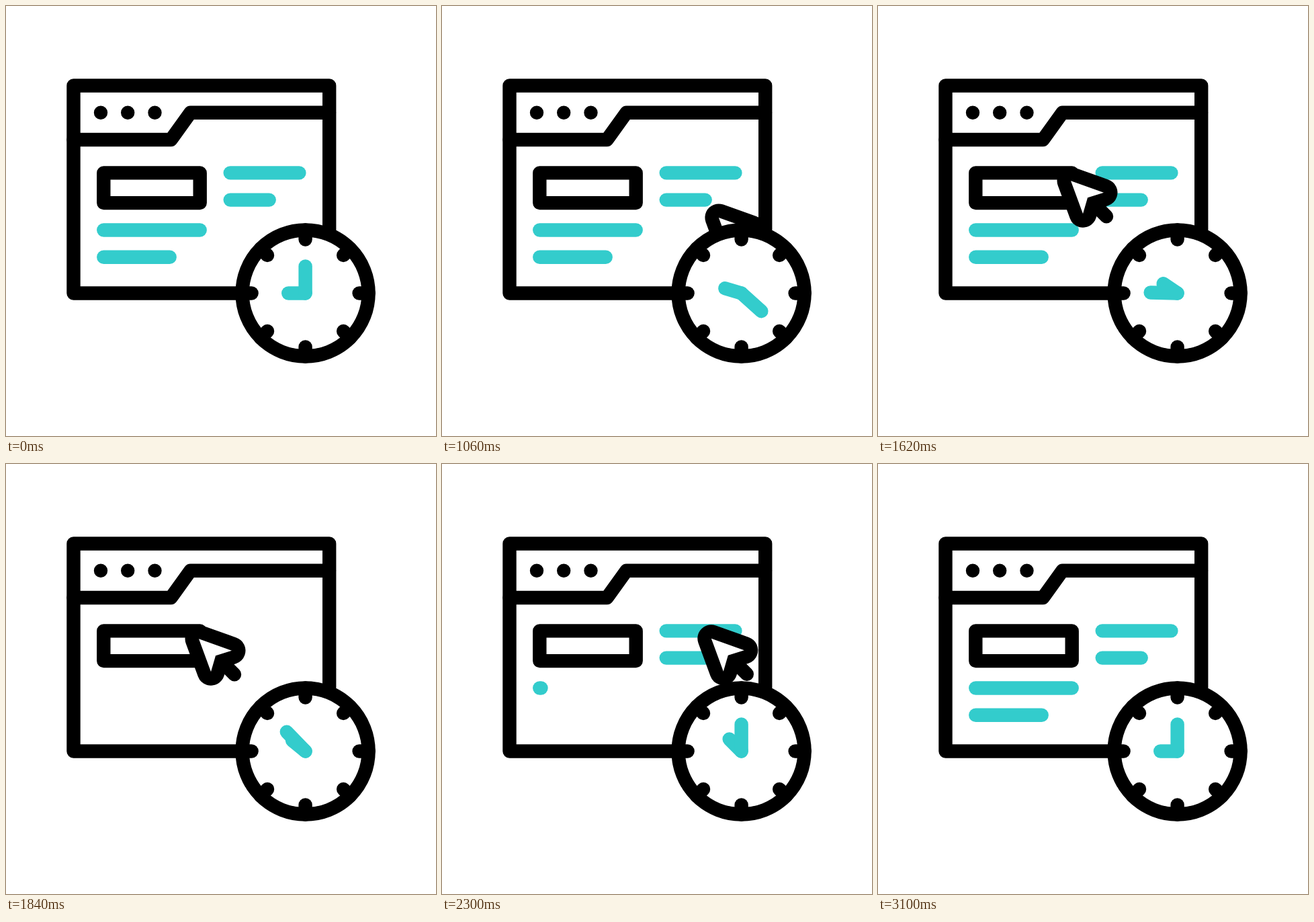
An HTML page that plays this animation: 640x640 px, repeating every 3.6 s.

```html
<!DOCTYPE html>
<html>
<head>
<meta charset="utf-8">
<style>
  html, body { margin: 0; width: 100%; height: 100%; overflow: hidden; background: #fff; }
  svg { display: block; width: 100vw; height: 100vh; }
  .line { fill: none; stroke: #000; stroke-width: 20.4; stroke-linecap: round; stroke-linejoin: round; }
  .teal { stroke: #3cc; }
</style>
</head>
<body>
<svg viewBox="0 0 640 640">
  <g class="line">
    <rect x="100.5" y="118.5" width="380.7" height="309"/>
    <path d="M100.5 199H245.5L274.5 158.7H481"/>
    <path d="M141 158.7h0M181.2 158.7h0M221.5 158.7h0"/>
    <rect x="145.3" y="248.4" width="143.4" height="44.7"/>
  </g>
  <g id="bars" class="line teal"></g>
  <g id="cursor">
    <path class="line" d="M30 30L52.5 52.5"/>
    <path d="M-.5-.5L48.5 17L24.5 24.5L17.5 48.5Z" fill="#fff" stroke="#000"
      stroke-width="41" stroke-linejoin="round" paint-order="stroke"/>
  </g>
  <g class="line" transform="translate(445.6 427.5)">
    <circle r="94" fill="#fff"/>
    <g id="ticks"></g>
    <path id="hour" class="teal" d="M0 0V-25.4"/>
    <path id="minute" class="teal" d="M0 0V-40"/>
  </g>
</svg>
<script>
const LOOP = 3600;
const $ = id => document.getElementById(id);
const mix = (a, b, u) => a + (b - a) * u;

// Smooth progress from 0 to 1 between two times
function ease(t, from, to) {
  const p = Math.min(1, Math.max(0, (t - from) / (to - from)));
  return p * p * (3 - 2 * p);
}

function addPath(parent, d) {
  const path = document.createElementNS('http://www.w3.org/2000/svg', 'path');
  path.setAttribute('d', d);
  parent.append(path);
  return path;
}

for (let i = 0; i < 8; i++) {
  addPath($('ticks'), 'M0-80V-94').setAttribute('transform', `rotate(${i * 45})`);
}

// Text bars: x, y, length; redrawn one after the other
const bars = [[333.7, 248.4, 102.7], [333.7, 288.6, 58], [145.3, 333.5, 143.4], [145.3, 373.8, 98.4]]
  .map(([x, y, length]) => ({ x, y, length, path: addPath($('bars'), '') }));
const CLEAR = 1720, REDRAW = 1988, BAR_TIME = 151;

function drawBars(t) {
  bars.forEach(({ x, y, length, path }, i) => {
    const start = REDRAW + i * BAR_TIME;
    const shown = t < CLEAR ? 1 : ease(t, start, start + BAR_TIME);
    path.setAttribute('d', shown ? `M${x} ${y}h${length * shown}` : '');
  });
}

// Cursor stops: behind the clock, on the box, beside the bars
const HIDDEN = [421, 403], BOX = [287.5, 260.7], SIDE = [401.3, 260.2], BEND = [411, 260.5];

function cursorAt(t) {
  if (t < 1900) {
    const u = ease(t, 790, 1580), v = 1 - u;
    return [0, 1].map(k => v ** 3 * HIDDEN[k] + 3 * u * v * BEND[k] + u ** 3 * BOX[k]);
  }
  const right = ease(t, 1966, 2300), back = ease(t, 2300, 2880);
  return [0, 1].map(k => mix(mix(BOX[k], SIDE[k], right), HIDDEN[k], back));
}

function draw(now) {
  const t = now % LOOP;
  const turn = t < 2300 ? ease(t, 200, 2300) : 1 - ease(t, 2300, 3100);
  $('minute').setAttribute('transform', `rotate(${360 * turn})`);
  $('hour').setAttribute('transform', `rotate(${270 + 45 * turn})`);
  $('cursor').setAttribute('transform', `translate(${cursorAt(t)})`);
  drawBars(t);
}

const begin = performance.now();
function frame() {
  draw(performance.now() - begin);
  requestAnimationFrame(frame);
}
frame();
</script>
</body>
</html>
```
